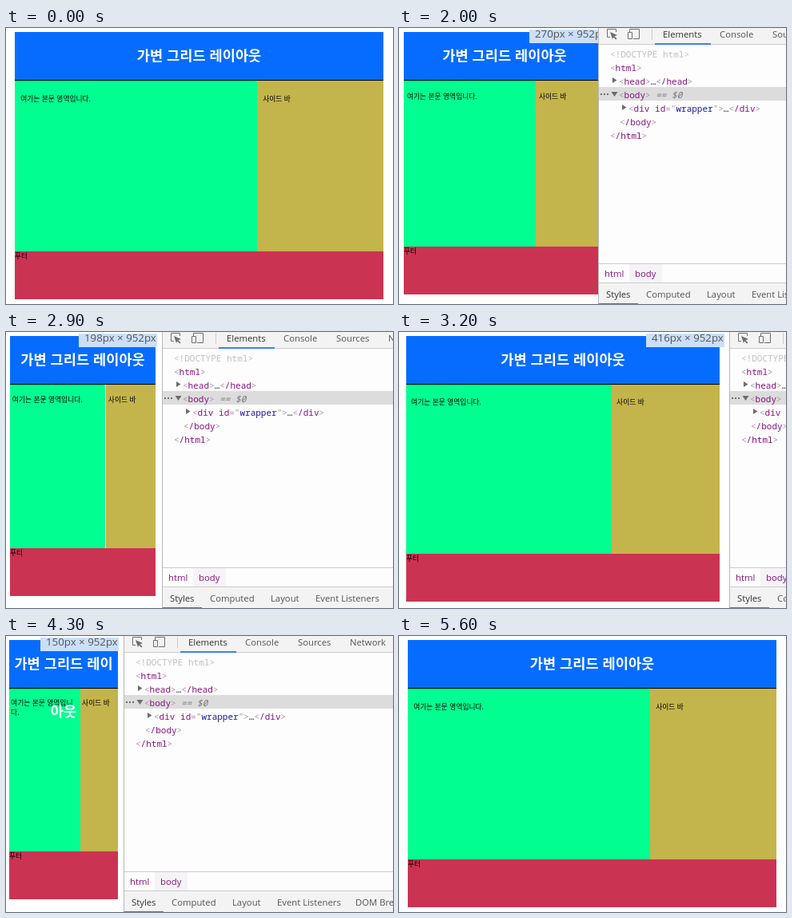
An HTML page for the animation above (6300 ms loop, 484 by 346 pixels).

```html
<!DOCTYPE html>
<html lang="ko">
<head>
<meta charset="utf-8">
<title>가변 그리드 레이아웃</title>
<style>
html, body { margin: 0; width: 100%; height: 100%; overflow: hidden; background: #fff; }
#stage { position: relative; width: 484px; height: 346px; overflow: hidden; background: #fff; }
#stage div, #stage span.t, #stage svg { position: absolute; box-sizing: border-box; }
#page { font: 8.75px/12px "Noto Sans CJK KR", "Noto Sans CJK", "Noto Sans CJK JP", sans-serif; color: #000; }
#head { top: 5px; height: 61px; background: #066cff; border-bottom: 1px solid #000; z-index: 1; }
#head b { display: block; position: relative; top: -1px; font-size: 17.6px; line-height: 60px; text-align: center; color: #fff; }
#main, #side { top: 66px; }
#main { background: #00ff90; }
#side { background: #c4b44c; }
#main p, #side p { margin: 10px 0; }
#foot { height: 60px; background: #cb3353; }
#size { top: 2px; width: 98px; height: 17px; padding-left: 7px; background: #cbdff8; color: #555; z-index: 2;
  font: 13.3px/11px "Open Sans", "Noto Sans", sans-serif; white-space: nowrap; }
#panel { top: 0; width: 484px; height: 346px; background: #fdfdfd; border-left: 1px solid #b8b8b8; z-index: 3;
  font: 11.3px/18px "Open Sans", "Noto Sans", sans-serif; color: #555; white-space: nowrap; }
.bar { left: 0; width: 100%; background: #f3f3f3; }
.mono { font: 11px/17px "Noto Sans Mono", "Liberation Mono", monospace; color: #222; white-space: pre; }
.mono u { text-decoration: none; color: #a894a6; }
.mono b { font-weight: 400; color: #881280; }
.mono i { color: #777; }
.on { color: #333; }
.crumb { color: #881280; }
</style>
</head>
<body>
<div id="stage">
  <div id="page">
    <div id="head"><b>가변 그리드 레이아웃</b></div>
    <div id="main"><p>여기는 본문 영역입니다.</p></div>
    <div id="side"><p>사이드 바</p></div>
    <div id="foot">푸터</div>
  </div>
  <div id="size"></div>
  <div id="panel">
    <div class="bar" style="top:0;height:21px;border-bottom:1px solid #ccc"></div>
    <svg width="70" height="19" fill="none" stroke="#6e6e6e" style="left:0;top:0">
      <path d="M14 11.5H10.5V1.5H21.5V5M38.5 5V1.5H50.5V13.5H43M36.5 5.5H41.5V13.5H36.5Z"/>
      <path d="M14 5L23 9L19.5 10.2L22.5 13.2L21.2 14.5L18.2 11.5L17 14Z" fill="#6e6e6e" stroke="none"/>
      <path d="M66.5 1V15" stroke="#ccc"/>
    </svg>
    <div style="left:70px;top:19px;width:70px;height:2px;background:#3b82f0"></div>
    <div style="left:0;top:74px;width:100%;height:17px;background:#dcdcdc"></div>
    <div style="left:0;top:295px;width:100%;height:1px;background:#ccc"></div>
    <div style="left:38px;top:296px;width:41px;height:23px;background:#f5f3f6"></div>
    <div class="bar" style="top:319px;height:27px;border-top:1px solid #ccc"></div>
    <div style="left:0;top:345px;width:49px;height:1px;background:#777"></div>
    <svg width="60" height="120" fill="#6e6e6e" style="left:0;top:0">
      <path d="M17 62L22.500 65.500L17 69ZM15.500 80H23.500L19.500 86ZM29 96L34.500 99.500L29 103Z"/>
      <path d="M2 82h2v2h-2zm4 0h2v2h-2zm4 0h2v2h-2z"/>
    </svg>
  </div>
</div>
<script>
const LOOP = 6300, STEP = 100, FULL = 489;
// start, steps, page width from/to, panel edge from/to
const moves = [
  [0, 0, FULL, FULL, 487, 487],
  [1600, 4, 483, 270, 447, 250],
  [2000, 3, 270, 150, 250, 148],
  [2900, 4, 198, FULL, 196, 487],
  [3900, 4, 440, 150, 438, 148],
  [4800, 2, 250, FULL, 248, 487]
];
const $ = id => document.getElementById(id);
const [head, main, side, foot, size, panel] = ['head', 'main', 'side', 'foot', 'size', 'panel'].map($);

function put(x, mid, html, cls = '') {
  const s = document.createElement('span');
  s.className = 't ' + cls;
  s.innerHTML = html;
  s.style.left = x + 'px';
  s.style.top = mid - 9 + 'px';
  panel.append(s);
}

const tag = (name, attrs = '') => `<u>&lt;</u><b>${name}</b>${attrs}<u>&gt;</u>`;
const wrapId = ' <b>id</b><u>="</u><span style="color:#1a1aa6">wrapper</span><u>"</u>';
[
  [14, '<span style="color:#c0c0c0">&lt;!DOCTYPE html&gt;</span>'],
  [14, tag('html')],
  [25, tag('head') + '…' + tag('/head')],
  [25, tag('body') + ' <i>== $0</i>'],
  [37, tag('div', wrapId) + '…' + tag('/div')],
  [26, tag('/body')],
  [14, tag('/html')]
].forEach(([x, html], i) => put(x, 33 + 17 * i, html, 'mono'));

[[80, 'Elements'], [151, 'Console'], [217, 'Sources'], [282, 'Network']]
  .forEach(([x, s], i) => put(x, 8, s, i ? '' : 'on'));
[[7, 'html'], [45, 'body']].forEach(([x, s]) => put(x, 308, s, 'crumb'));
[[9, 'Styles'], [59, 'Computed'], [135, 'Layout'], [191, 'Event Listeners'], [289, 'DOM Breakpoints']]
  .forEach(([x, s], i) => put(x, 334, s, i ? '' : 'on'));

function span(el, a, b) {
  el.style.left = Math.round(a) + 'px';
  el.style.width = Math.round(b) - Math.round(a) + 'px';
}

function layout(view) {
  const body = view - 8.5, w = body * .96;
  const left = 1.25 + body * .02, right = left + w;
  const split = left + w * .65625, pad = w * .015625;
  const bottom = Math.round(265.75 + 2 * pad);
  span(head, left, right);
  span(main, left, split);
  span(side, split + .1, right);
  span(foot, left, right);
  for (const el of [main, side]) {
    el.style.height = bottom - 66 + 'px';
    el.style.padding = pad + 'px';
  }
  foot.style.top = bottom + 'px';
  size.style.left = Math.round(view) - 107 + 'px';
  size.textContent = Math.round(view) + 'px × 952px';
}

let last = '';
function draw(t) {
  const [t0, n, v0, v1, p0, p1] = moves.filter(m => m[0] <= t).pop();
  const k = n ? Math.min(1, Math.floor((t - t0) / STEP) / n) : 1;
  const shown = t >= 1600 && t < 5600;
  const key = [t0, k, shown].join();
  if (key === last) return;
  last = key;
  layout(v0 + (v1 - v0) * k);
  panel.style.left = Math.round(p0 + (p1 - p0) * k) - 1 + 'px';
  size.style.display = shown ? '' : 'none';
}

const begin = performance.now();
function tick() {
  draw((performance.now() - begin) % LOOP);
  requestAnimationFrame(tick);
}
tick();
</script>
</body>
</html>
```
